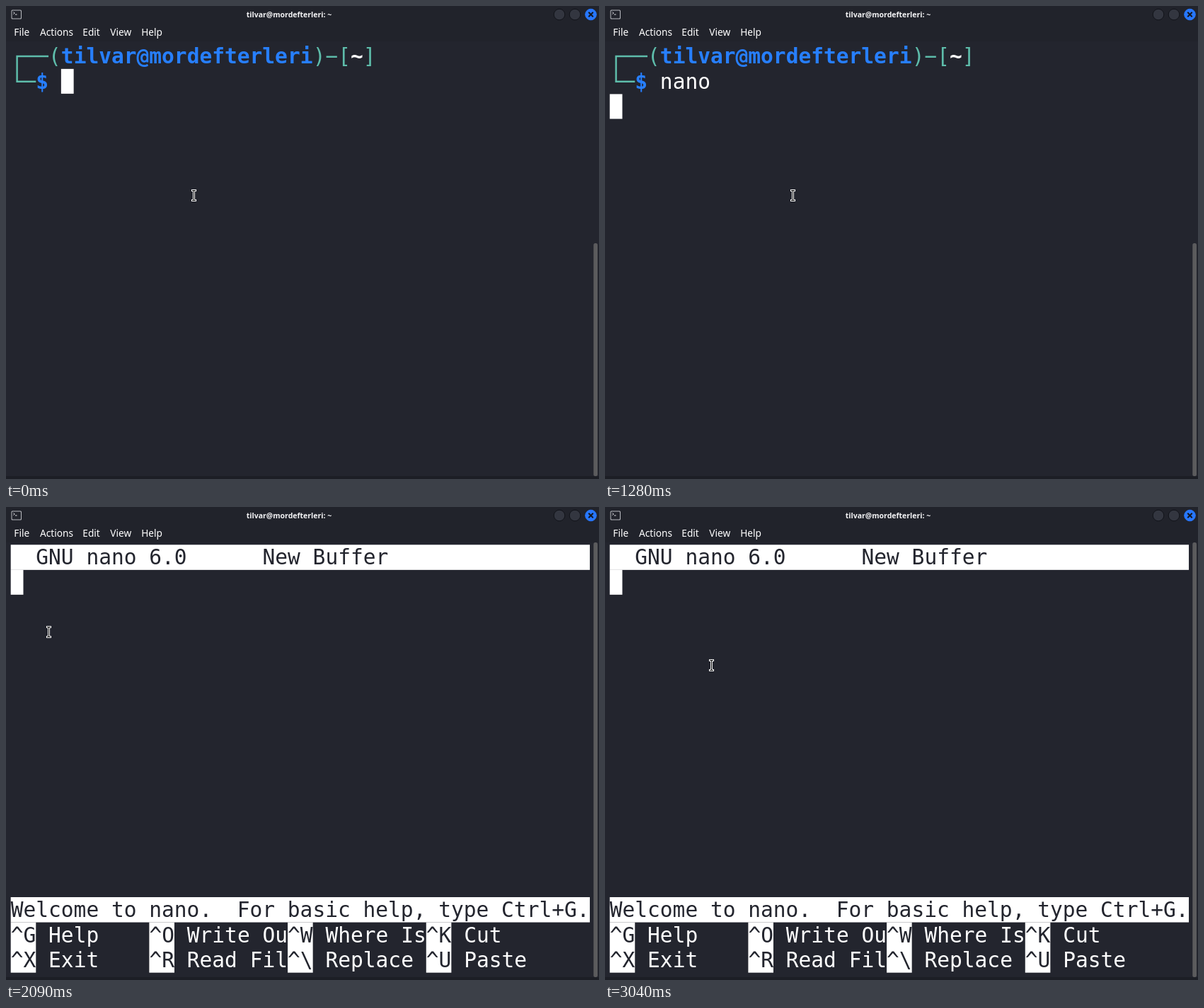
These frames come from a looping animation (838 px wide and 668 px high, 3.11 s). An HTML page with a canvas:

```html
<!DOCTYPE html>
<html lang="en">
<head>
<meta charset="utf-8">
<title>Terminal</title>
<style>
html, body { margin: 0; width: 100%; height: 100%; overflow: hidden; background: #23252e; }
canvas { display: block; }
</style>
</head>
<body>
<canvas id="stage" width="838" height="668"></canvas>
<script>
const ctx = document.getElementById('stage').getContext('2d');
const LOOP = 3110;
const BG = '#23252e', WHITE = '#ffffff', TEAL = '#5ebdab', BLUE = '#277fff';
const MONO = '"DejaVu Sans Mono", monospace', SANS = '"Noto Sans", sans-serif';
const USER = 'tilvar@mordefterleri';

// Terminal grid
const LEFT = 6.7, TOP = 53.3, COL = 17.79, ROW = 35.55;
const FONT_SIZE = COL / 0.60205;
const colX = c => LEFT + c * COL;
const rowY = r => TOP + r * ROW;

// Time, x, y of each pointer position
const POINTER = [
  [0, 265.5, 267.5], [1680, 245.5, 261.5], [1750, 210.5, 247.5], [1810, 172.5, 234.5],
  [1870, 136.5, 222.5], [1950, 88.5, 203.5], [2020, 57.5, 186.5], [2090, 60.5, 176.5],
  [2160, 78.5, 184.5], [2230, 104.5, 168.5], [2300, 143.5, 181.5], [2370, 203.5, 237.5],
  [2440, 137.5, 208.5], [2630, 138.5, 208.5], [3040, 150.5, 223.5]
];
const KEY_TIMES = [400, 470, 530, 800];
const ENTER = 1280, EDITOR = 1400;

function box(x, y, w, h, color) {
  ctx.fillStyle = color;
  ctx.fillRect(x, y, w, h);
}

function roundBox(x, y, w, h, r, color) {
  ctx.fillStyle = color;
  ctx.beginPath();
  ctx.roundRect(x, y, w, h, r);
  ctx.fill();
}

function line(points, color, width) {
  ctx.strokeStyle = color;
  ctx.lineWidth = width;
  ctx.beginPath();
  points.forEach(([x, y]) => ctx.lineTo(x, y));
  ctx.stroke();
}

function label(text, x, y, font, color = WHITE, align = 'left') {
  ctx.font = font;
  ctx.fillStyle = color;
  ctx.textAlign = align;
  ctx.fillText(text, x, y);
}

function cells(text, col, row, color = WHITE, weight = 'normal') {
  label(text, colX(col), rowY(row) + 28, `${weight} ${FONT_SIZE}px ${MONO}`, color);
}

function block(col, row, cols, rows = 1) {
  box(colX(col), rowY(row), cols * COL, rows * ROW, WHITE);
}

function caret(col, row) {
  box(colX(col), rowY(row), COL, 35, WHITE);
}

function button(x, fill, rim) {
  ctx.beginPath();
  ctx.arc(x, 12, 7.8, 0, 2 * Math.PI);
  ctx.fillStyle = fill;
  ctx.fill();
  ctx.strokeStyle = rim;
  ctx.lineWidth = 1;
  ctx.stroke();
}

function drawWindow() {
  box(0, 0, 838, 668, BG);
  box(0, 0, 838, 50, '#21232b');
  box(0, 664, 838, 4, '#1c1e25');

  roundBox(7.5, 5.5, 14.5, 13, 1.5, '#b9bbc0');
  roundBox(8.5, 6.5, 12.5, 11, 1, '#22242c');
  line([[10.5, 8.5], [12.2, 10], [10.5, 11.5]], '#e4e5e8', 1);
  line([[13, 12], [15.5, 12]], '#e4e5e8', 1);

  label(USER + ': ~', 400, 16, `bold 10.5px ${SANS}`, '#f4f4f6', 'center');
  button(782, '#333640', '#12141a');
  button(804, '#333640', '#12141a');
  button(826.5, '#2777ff', '#2777ff');
  line([[823.3, 8.8], [829.7, 15.2]], '#14161c', 2);
  line([[829.7, 8.8], [823.3, 15.2]], '#14161c', 2);

  const menu = [['File', 11.3], ['Actions', 47.9], ['Edit', 108.3], ['View', 147.2], ['Help', 191.2]];
  menu.forEach(([text, x]) => label(text, x, 42, `13.7px ${SANS}`));
}

function drawShell(t) {
  const x = colX(0.5), upper = rowY(0.5), lower = rowY(1.5);
  line([[colX(3), upper], [x, upper], [x, lower], [colX(2), lower]], TEAL, 2.5);
  cells('(', 3, 0, TEAL);
  cells(USER, 4, 0, BLUE, 'bold');
  cells(')\u2212[', 24, 0, TEAL);
  cells('~', 27, 0, WHITE, 'bold');
  cells(']', 28, 0, TEAL);
  cells('$', 2, 1, BLUE, 'bold');

  const typed = KEY_TIMES.filter(k => t >= k).length;
  cells('nano'.slice(0, typed), 4, 1);
  if (t < ENTER) caret(4 + typed, 1);
  else caret(0, 2);
}

function drawEditor() {
  block(0, 0, 46);
  cells('GNU nano 6.0', 2, 0, BG);
  cells('New Buffer', 20, 0, BG);
  caret(0, 1);
  block(0, 14, 46);
  cells('Welcome to nano.  For basic help, type Ctrl+G.', 0, 14, BG);

  const help = [
    [['^G', 'Help'], ['^X', 'Exit']],
    [['^O', 'Write Ou'], ['^R', 'Read Fil']],
    [['^W', 'Where Is'], ['^\\', 'Replace']],
    [['^K', 'Cut'], ['^U', 'Paste']]
  ];
  help.forEach((keys, i) => {
    const col = 11 * i;
    block(col, 15, 2, 2);
    keys.forEach(([key, name], j) => {
      cells(key, col, 15 + j, BG);
      cells(name, col + 3, 15 + j);
    });
  });
}

function drawPointer(t) {
  const [, x, y] = POINTER.findLast(p => t >= p[0]);
  const bar = (dy, w, h, color) => box(x - w / 2, y + dy - h / 2, w, h, color);
  bar(0, 3, 17, WHITE);
  bar(-7, 7, 3, WHITE);
  bar(7, 7, 3, WHITE);
  bar(0, 1, 15, '#000');
  bar(-7, 5, 1, '#000');
  bar(7, 5, 1, '#000');
}

function draw(now) {
  const t = now % LOOP;
  const editing = t >= EDITOR;
  drawWindow();
  if (editing) drawEditor();
  else drawShell(t);
  const top = editing ? 50 : 335;
  roundBox(830.3, top, 5.7, 664 - top, 2.5, '#5b5b5d');
  drawPointer(t);
}

const start = performance.now();
function tick() {
  draw(performance.now() - start);
  requestAnimationFrame(tick);
}
tick();
</script>
</body>
</html>
```
